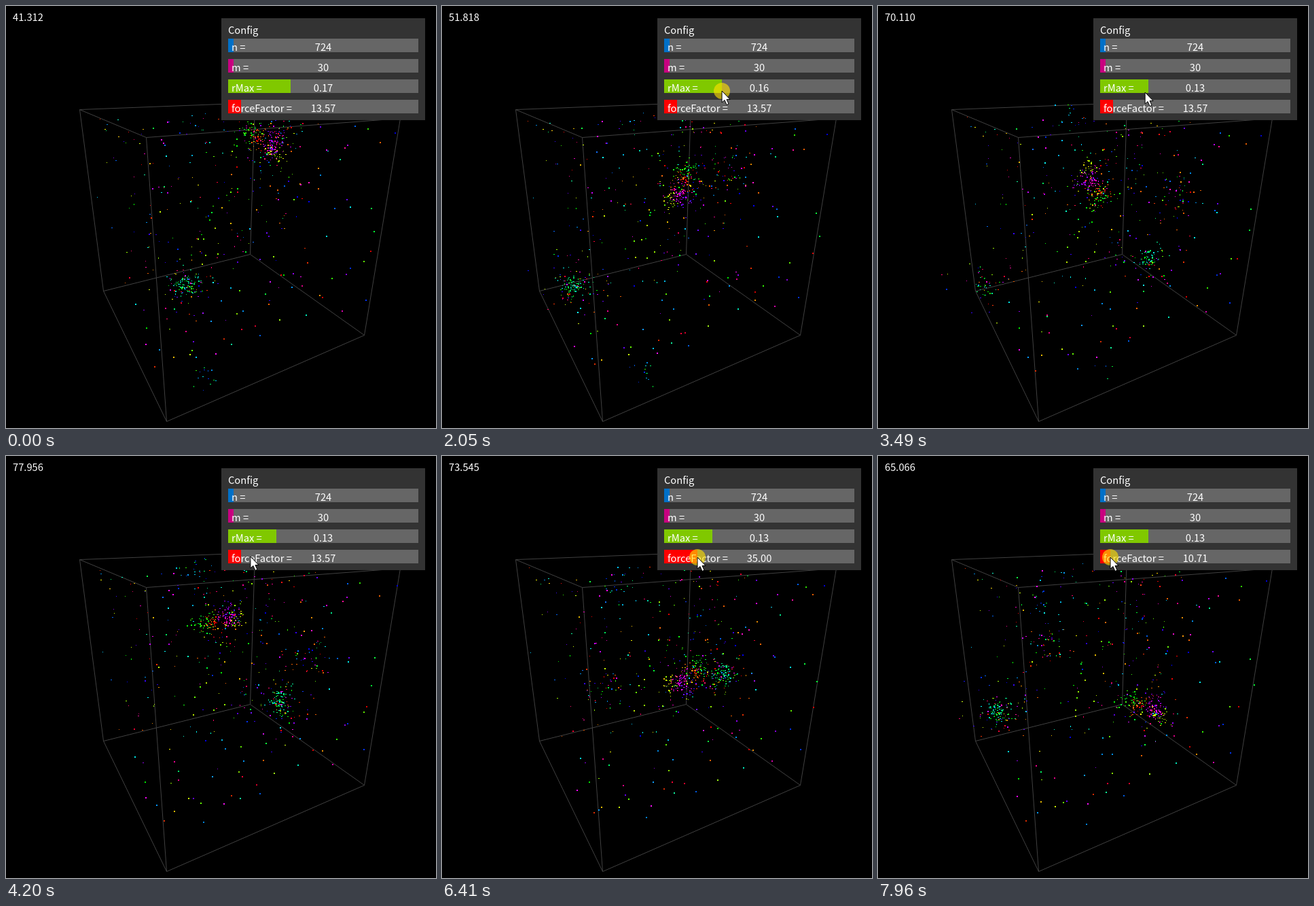
Recreate the animation shown at these times as an HTML page with a canvas. Size 633 by 621 pixels, loop 7990 ms.

```html
<!DOCTYPE html>
<html lang="en">
<head>
<meta charset="utf-8">
<title>Particle cube</title>
<style>
  html, body { margin: 0; width: 100%; height: 100%; overflow: hidden; background: #000; }
  canvas { display: block; }
</style>
</head>
<body>
<canvas id="stage" width="633" height="621"></canvas>
<script>
const ctx = document.getElementById('stage').getContext('2d');
const LOOP = 7990, TICK = 10;
const FONT = '14.7px "Noto Sans CJK SC", "Noto Sans CJK JP", "Noto Sans CJK", "Noto Sans", sans-serif';
const BAR_X = 327;
const CURSOR_IN = 800, RANGE_PRESS = 1600, RANGE_RELEASE = 3400, FORCE_PRESS = 4700;
const TOTAL = 724;

// Cube corners, indexed by bits: 1 = along, 2 = towards the viewer, 4 = down.
const CORNERS = [[108, 152], [366, 142], [206, 193], [580, 165],
                 [143, 419], [359, 365], [236, 611], [527, 484]];

// Key points: [time, ...values]. Two keys at one time make a jump.
const CURSOR = [[CURSOR_IN, 380, 140], [1000, 436, 130], [1280, 419, 126], [2830, 405, 124],
                [RANGE_RELEASE, 398, 124], [4100, 360, 148], [5170, 359, 148],
                [6410, 376, 149], [7960, 342, 149]];
const RATE = [[0, 41.312], [1280, 40.961], [2830, 62.817], [4200, 77.956],
              [5170, 81.302], [6410, 73.545], [7960, 65.066]];
const MAIN = [[0, 376, 198], [1280, 380, 238], [2830, 325, 287], [4200, 312, 242],
              [5170, 338, 285], [7960, 392, 368]];
const MAIN_TURN = [[0, -2.6], [2830, -0.6], [5170, 5.3], [6410, 5.7], [7960, 3.5]];
// These leave through one wall of the cube and return at the opposite one.
const TEAL = [[0, 268, 409], [3400, 148, 409], [3400, 399, 374], [6900, 415, 312],
              [6900, 190, 360], [7960, 175, 376]];
const MIXED = [[0, 400, 185], [5600, 466, 342], [5600, 236, 380], [7960, 253, 273]];
const LOW = [[0, 298, 543], [1280, 278, 532], [3400, 340, 535], [3400, 292, 150], [7960, 238, 212]];

let seed = 724;
function random() {
  seed = (seed + 0x6D2B79F5) | 0;
  let r = Math.imul(seed ^ seed >>> 15, 1 | seed);
  r = (r + Math.imul(r ^ r >>> 7, 61 | r)) ^ r;
  return ((r ^ r >>> 14) >>> 0) / 4294967296;
}

function sample(keys, t) {
  let i = 1;
  while (i < keys.length - 1 && keys[i][0] < t) i++;
  const [a, b] = [keys[i - 1], keys[i]];
  const k = Math.max(0, Math.min(1, (t - a[0]) / (b[0] - a[0])));
  return a.slice(1).map((v, j) => v + (b[j + 1] - v) * k);
}

function project(u, v, w) {
  const point = [0, 0];
  CORNERS.forEach(([x, y], i) => {
    const weight = (i & 1 ? u : 1 - u) * (i & 2 ? v : 1 - v) * (i & 4 ? w : 1 - w);
    point[0] += x * weight;
    point[1] += y * weight;
  });
  return point;
}

const dots = [];

function addDot(hue, size, place) {
  dots.push({ color: `hsl(${Math.round(hue / 12) * 12}, 100%, ${42 + 12 * random()}%)`,
              width: Math.round(size + random() * 0.8), height: Math.round(size + random() * 0.4),
              phase: random() * 6.28, speed: 0.6 + random() * 1.2, ...place });
}

// A swarm around a moving centre; "arm" and "bearing" set it off from a turning centre.
function addSwarm(path, count, spread, hue, hueRange, arm = 0, bearing = 0) {
  for (let i = 0; i < count; i++) {
    addDot(hue + (random() - 0.5) * hueRange, 1.2, {
      path, arm, bearing, lag: (random() - 0.5) * 900,
      radius: spread * Math.sqrt(-2 * Math.log(1 - random())), angle: random() * 6.28 });
  }
}

addSwarm(TEAL, 75, 8, 150, 90);
addSwarm(TEAL, 65, 23, 120, 360);
addSwarm(MAIN, 38, 8, 120, 40, 20);
addSwarm(MAIN, 38, 8, 18, 45, 9);
addSwarm(MAIN, 44, 8, 305, 40, 15, 3.1);
addSwarm(MAIN, 30, 9, 265, 40, 17, 2.6);
addSwarm(MAIN, 26, 8, 75, 45, 28, 3.3);
addSwarm(MAIN, 40, 23, 180, 360);
addSwarm(MIXED, 36, 12, 180, 360);
addSwarm(LOW, 14, 11, 180, 150);
while (dots.length < TOTAL) {
  const v = random();
  addDot(random() * 360, 0.9 + v * 0.8, { u: 1 - random() ** 1.2, v, w: random() ** 1.2 });
}

function dotPosition(dot, t) {
  const swing = Math.sin(t / 1000 * dot.speed + dot.phase);
  if (!dot.path) {
    const sway = Math.cos(t / 1300 * dot.speed + dot.phase);
    return project(dot.u + 0.02 * swing, dot.v + 0.02 * sway, dot.w + 0.03 * swing * sway);
  }
  const moment = dot.path === MAIN ? t : t + dot.lag;
  const [x, y] = sample(dot.path, moment);
  const turn = sample(MAIN_TURN, t)[0] + dot.bearing;
  const angle = dot.angle + swing;
  return [x + dot.arm * Math.cos(turn) + dot.radius * Math.cos(angle),
          y + dot.arm * Math.sin(turn) + dot.radius * Math.sin(angle)];
}

function drawDot(dot, t) {
  const [x, y] = dotPosition(dot, t);
  ctx.fillStyle = dot.color;
  ctx.fillRect(Math.round(x), Math.round(y), dot.width, dot.height);
}

function drawCube() {
  ctx.strokeStyle = '#404040';
  ctx.lineWidth = 1;
  ctx.beginPath();
  CORNERS.forEach(([x, y], i) => {
    for (const bit of [1, 2, 4]) {
      if (i & bit) continue;
      const [endX, endY] = CORNERS[i | bit];
      ctx.moveTo(x + 0.5, y + 0.5);
      ctx.lineTo(endX + 0.5, endY + 0.5);
    }
  });
  ctx.stroke();
}

function drawText(text, x, y, align = 'left') {
  ctx.fillStyle = '#fff';
  ctx.textAlign = align;
  ctx.fillText(text, x, y);
}

function drawSlider(row, label, value, width, color) {
  const y = 48 + row * 30;
  ctx.fillStyle = '#666';
  ctx.fillRect(BAR_X, y, 280, 20);
  ctx.fillStyle = color;
  ctx.fillRect(BAR_X, y, width, 20);
  drawText(label + ' =', 332, y + 18);
  drawText(value, 467, y + 18, 'center');
}

function drawCursor(x, y, pressed) {
  if (pressed) {
    ctx.fillStyle = 'rgba(255, 225, 0, .62)';
    ctx.beginPath();
    ctx.arc(x, y, 12, 0, 7);
    ctx.fill();
  }
  ctx.save();
  ctx.translate(x, y);
  const arrow = new Path2D('M0 0V17L4 13.5 7 20.5 10 19 7 12.5H12Z');
  ctx.fillStyle = '#fff';
  ctx.fill(arrow);
  ctx.strokeStyle = '#000';
  ctx.lineWidth = 1;
  ctx.stroke(arrow);
  ctx.restore();
}

function drawPanel(t) {
  const [x, y] = sample(CURSOR, t);
  const dragRange = t >= RANGE_PRESS && t < RANGE_RELEASE;
  const dragForce = t >= FORCE_PRESS;
  const range = dragRange ? x - BAR_X : t < RANGE_PRESS ? 92 : 71;
  const force = dragForce ? Math.round(x - BAR_X) : 19;

  ctx.fillStyle = '#333';
  ctx.fillRect(317, 18, 300, 150);
  drawText('Config', BAR_X, 41);
  drawSlider(0, 'n', '724', 8, '#0070c8');
  drawSlider(1, 'm', '30', 8, '#c80080');
  drawSlider(2, 'rMax', (0.01 + range * 0.00175).toFixed(2), range, '#80c800');
  drawSlider(3, 'forceFactor', (force / 1.4).toFixed(2), force, '#f00');
  if (t >= CURSOR_IN) drawCursor(x, y, dragRange || dragForce);
}

function draw() {
  const t = Math.floor(performance.now() % LOOP / TICK) * TICK;
  ctx.fillStyle = '#000';
  ctx.fillRect(0, 0, 633, 621);
  ctx.font = FONT;
  drawCube();
  for (const dot of dots) drawDot(dot, t);
  drawPanel(t);
  drawText(sample(RATE, t)[0].toFixed(3), 10, 22);
  requestAnimationFrame(draw);
}
draw();
</script>
</body>
</html>
```
